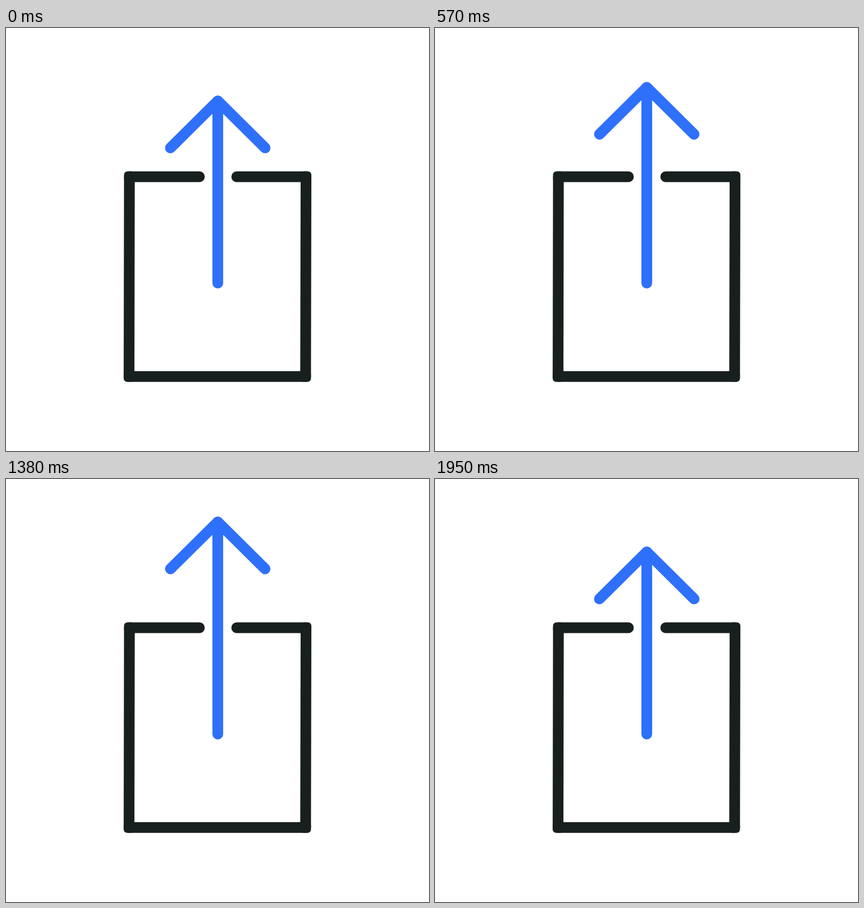
These frames come from a looping animation (748 by 748 pixels, 3.66 s). An HTML page with a canvas:

```html
<!DOCTYPE html>
<html lang="en">
<head>
<meta charset="utf-8">
<title>Upload arrow</title>
<style>
  html, body { margin: 0; width: 100%; height: 100%; overflow: hidden; background: #fff; }
  canvas { display: block; width: 748px; height: 748px; }
</style>
</head>
<body>
<canvas id="stage" width="748" height="748"></canvas>
<script>
const ctx = document.getElementById('stage').getContext('2d');
const LOOP = 3660, STEP = 30;
const LOW = 129, HIGH = 74.5;
const INK = '#181f1f', BLUE = '#2f70fb';

// [time in ms, height of the arrow tip]
const KEYS = [
  [0, LOW], [410, HIGH], [708, LOW], [905, HIGH],
  [1204, LOW], [1400, HIGH], [1692, LOW], [LOOP, LOW]
];

function tipAt(t) {
  const i = KEYS.findIndex(key => key[0] > t);
  const [t0, y0] = KEYS[i - 1], [t1, y1] = KEYS[i];
  const ease = (1 - Math.cos(Math.PI * (t - t0) / (t1 - t0))) / 2;
  return y0 + (y1 - y0) * ease;
}

function line(points, color, width) {
  ctx.strokeStyle = color;
  ctx.lineWidth = width;
  ctx.lineCap = ctx.lineJoin = 'round';
  ctx.beginPath();
  for (const [x, y] of points) ctx.lineTo(x, y);
  ctx.stroke();
}

function drawBox() {
  const corners = [[218.2, 263], [217.6, 616.3], [529.8, 616.3], [530.5, 263]];
  line([[342, 263], ...corners, [408, 263]], INK, 19);
  // Tighten the outer corners
  ctx.fillStyle = INK;
  ctx.beginPath();
  for (const [x, y] of corners) ctx.roundRect(x - 9.5, y - 9.5, 19, 19, 6);
  ctx.fill();
}

function drawArrow(y) {
  line([[374.5, y], [374.5, 451]], BLUE, 19);
  line([[290.7, y + 83], [374.5, y], [458.2, y + 83]], BLUE, 19);
}

function frame(now) {
  const t = Math.floor((now % LOOP) / STEP) * STEP;
  ctx.fillStyle = '#fff';
  ctx.fillRect(0, 0, 748, 748);
  drawBox();
  drawArrow(tipAt(t));
  requestAnimationFrame(frame);
}

frame(performance.now());
</script>
</body>
</html>
```
